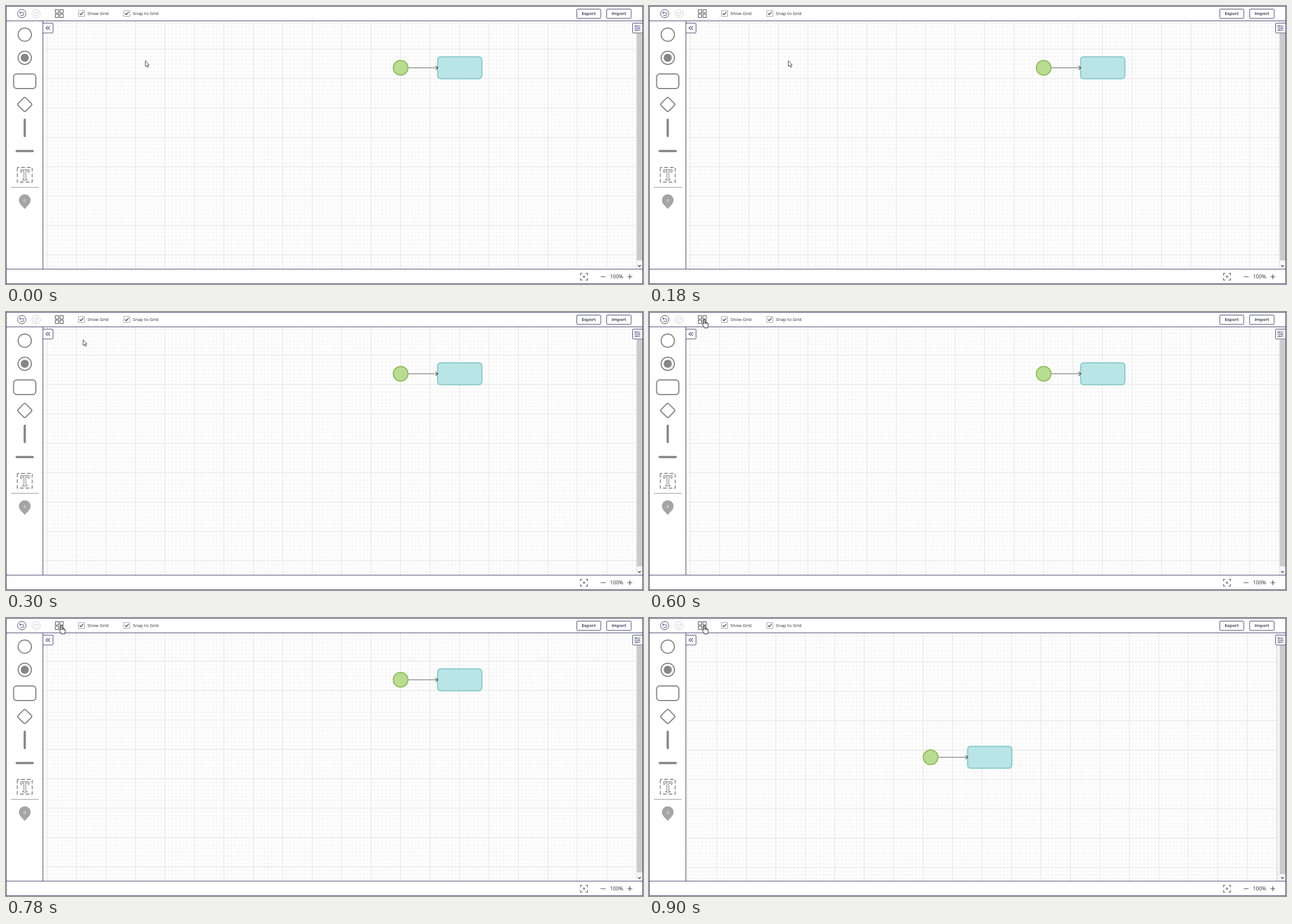
These frames come from a looping animation (1131x495 px, 1.2 s). An HTML page:

```html
<!DOCTYPE html>
<html lang="en">
<head>
<meta charset="utf-8">
<title>Diagram editor</title>
<style>
html, body { margin: 0; width: 100%; height: 100%; overflow: hidden; background: #fff; }
svg { display: block; }
text { font: 7.85px "Open Sans", "Noto Sans", sans-serif; fill: #2c2c36; }
.bold { font-weight: 600; fill: #25223f; text-anchor: middle; }
.ink { fill: none; stroke: #47436f; }
.tool { fill: none; stroke: #868686; stroke-width: 2; }
.icon { fill: none; stroke: #45454f; }
</style>
</head>
<body>
<svg width="1131" height="495" viewBox="0 0 1131 495">
  <defs>
    <clipPath id="canvas"><path d="M66 27H1120V468H66z"/></clipPath>
    <g id="undo">
      <circle r="7.4"/>
      <path d="M-1.6 -4L-4 -1.7L-1.6 .6M-4 -1.7H1.2A2.4 2.4 0 0 1 1.2 3.4H-2.5"/>
    </g>
    <g id="check">
      <path d="M.5 .5H11.5V11H.5z" fill="#fff" stroke="#a2a2aa"/>
      <path d="M2.8 5.6L5 8L9.4 3.2" fill="none" stroke="#34343f" stroke-width="1.2"/>
    </g>
  </defs>

  <g clip-path="url(#canvas)">
    <g id="grid" fill="none">
      <path id="minor" stroke="#f3f3f3"/>
      <path id="major" stroke="#e9e9e9" stroke-width="1.5"/>
    </g>
    <g id="flow">
      <circle cx="700.7" cy="110" r="13" fill="#b9dd90" stroke="#8cbd5c" stroke-width="2"/>
      <rect x="766.3" y="90.5" width="78.6" height="39" rx="5.5" fill="#b9e5e6" stroke="#87c8ca" stroke-width="2"/>
      <path d="M714.5 110H767M762.5 106.5L767 110L762.5 113.5" fill="none" stroke="#5b5b5b" stroke-width="1.2"/>
    </g>
  </g>

  <!-- scroll bar -->
  <path d="M1120 27H1130V468H1120z" fill="#f8f8f8"/>
  <path id="track" d="M1115.5 27H1120V468H1115.5z" fill="#f5f5f5"/>
  <path id="edge" d="M1115 27V468" stroke="#dcdcdc" stroke-width="1.5"/>
  <rect id="thumb" x="1120" y="49" width="10" fill="#cbcbcb"/>
  <path d="M1122.3 461.5L1124.7 464L1127.1 461.5" class="icon" stroke-width="1.3"/>

  <!-- frame and panel handles -->
  <path class="ink" d="M.5 .5H1130.5V494.5H.5zM0 26.5H1131M65.5 27V468M0 468.5H1131"/>
  <g class="ink">
    <path fill="#fff" d="M65.5 30.5H82Q83.5 30.5 83.5 32V46.5Q83.5 48 82 48H65.5z"/>
    <path stroke-width="1.2" d="M74.2 36L71 39.2L74.2 42.4M78 36L74.8 39.2L78 42.4"/>
    <path fill="#fff" d="M1130.5 30.5H1114Q1112.5 30.5 1112.5 32V46.5Q1112.5 48 1114 48H1130.5z"/>
    <path d="M1115.5 35.8H1126.5M1115.5 39.4H1126.5M1115.5 43H1126.5"/>
    <g fill="#fff"><circle cx="1118.5" cy="35.8" r="1.2"/><circle cx="1123.7" cy="39.4" r="1.2"/><circle cx="1119.5" cy="43" r="1.2"/></g>
  </g>

  <!-- top bar -->
  <use href="#undo" x="28" y="13.5" class="ink"/>
  <use href="#undo" transform="translate(53.5 13.5) scale(-1 1)" fill="none" stroke="#cfcfd4"/>
  <path class="icon" stroke="#3d3a5e" d="M87.5 6.5h6v6h-6zM95.8 6.5h6v6h-6zM87.5 14.5h6v6h-6zM95.8 14.5h6v6h-6z"/>
  <use href="#check" x="128" y="7.5"/>
  <use href="#check" x="208.5" y="7.5"/>
  <text x="144.6" y="16.4">Show Grid</text>
  <text x="225.3" y="16.4">Snap to Grid</text>
  <g class="ink">
    <rect x="1013.5" y="5.5" width="42.5" height="16.5" rx="1.5"/>
    <rect x="1066.5" y="5.5" width="43.5" height="16.5" rx="1.5"/>
  </g>
  <text class="bold" x="1034.6" y="16.4">Export</text>
  <text class="bold" x="1088.2" y="16.4">Import</text>

  <!-- shape palette -->
  <g class="tool">
    <circle cx="33.3" cy="51" r="11.8"/>
    <circle cx="33.3" cy="92.2" r="11.8"/>
    <circle cx="33.3" cy="92.2" r="7.2" fill="#868686" stroke="none"/>
    <rect x="13.5" y="121" width="39.5" height="26" rx="5.5"/>
    <rect x="-9.6" y="-9.6" width="19.2" height="19.2" rx="3" transform="translate(33.3 175.3) rotate(45)"/>
    <path d="M33.3 202.5V231.5M19 258.3H47.5" stroke-width="4" stroke-linecap="round"/>
    <path d="M20 287.5H46.5V313.5H20z" stroke="#707070" stroke-width="1.3" stroke-dasharray="6.5 3.6" stroke-dashoffset="3"/>
    <path d="M26 291.5H41V296.3H39.5Q39 293.6 37 293.6H35.2V307.5Q35.2 308.6 37.5 308.6V310H29.3V308.6Q31.8 308.6 31.8 307.5V293.6H30Q28 293.6 27.5 296.3H26z" stroke="#707070" stroke-width="1"/>
    <path d="M9 323H58" stroke="#b2b2b2" stroke-width="1.4"/>
  </g>
  <path d="M33.3 361.5C30 357 22.9 352.5 22.9 345.6A10.4 10.4 0 0 1 43.7 345.6C43.7 352.5 36.6 357 33.3 361.5z" fill="#a5a5a5"/>
  <text x="33.3" y="348.9" text-anchor="middle" style="font-size:7px;fill:#fff">0</text>

  <!-- zoom bar -->
  <g class="icon">
    <path d="M1020 479.5V476H1023.5M1029 476H1032.5V479.5M1032.5 484.5V488H1029M1023.5 488H1020V484.5" stroke-width="1.1"/>
    <circle cx="1026.3" cy="482" r="1.5"/>
    <path d="M1055.8 482H1064.5M1103.3 482H1112M1107.6 477.7V486.3" stroke-width="1.2"/>
  </g>
  <text x="1072.2" y="485.4" style="font-size:9.4px">100%</text>

  <!-- pointers, each with its hot spot at 0,0 -->
  <path id="arrow" d="M.4 .4V10.6L2.7 8.6L4.4 12.3L6 11.6L4.4 8H7.3z" fill="#fff" stroke="#333" stroke-width=".9"/>
  <path id="hand" transform="translate(98.5 12.5)" d="M-1.4 8.8V1.4Q-1.4 .3 -.2 .3T1 1.4V5.6Q1.6 4.9 2.9 5.6V6.4Q3.8 5.6 4.8 6.6V7.3Q6.6 6.8 6.6 8.6V11.6Q6.6 13 5.6 14.2V15.8H-.4V14.6L-3.4 10.4Q-4 9 -3 8.5Q-2.2 8.2 -1.4 8.8zM1 5.6V8.6M2.9 6V8.8M4.8 6.8V9" fill="#fff" stroke="#222" stroke-width="1"/>
</svg>
<script>
const $ = id => document.getElementById(id);
const CELL = 52.3, STEP = 300;

function gridPath(gap) {
  let d = "";
  for (let x = 73 - 2 * CELL; x < 1240; x += gap) d += `M${x.toFixed(2)} -30V560`;
  for (let y = 77 - 2 * CELL; y < 560; y += gap) d += `M-40 ${y.toFixed(2)}H1240`;
  return d;
}
$("minor").setAttribute("d", gridPath(CELL / 8));
$("major").setAttribute("d", gridPath(CELL));

const show = (id, on) => $(id).style.display = on ? "" : "none";
const move = (id, x, y) => $(id).setAttribute("transform", `translate(${x} ${y})`);

function draw(now) {
  const step = Math.floor(now / STEP) % 4;
  const hovering = step >= 2, centred = step === 3;
  show("arrow", !hovering);
  show("hand", hovering);
  if (step === 0) move("arrow", 247, 97);
  else move("arrow", 136.5, 49);
  move("flow", centred ? -200.7 : 0, centred ? 138 : 0);
  move("grid", centred ? -4.7 : 0, centred ? 1.3 : 0);
  show("track", centred);
  show("edge", centred);
  $("thumb").setAttribute("height", centred ? 407 : 404);
  requestAnimationFrame(draw);
}
draw(performance.now());
</script>
</body>
</html>
```
